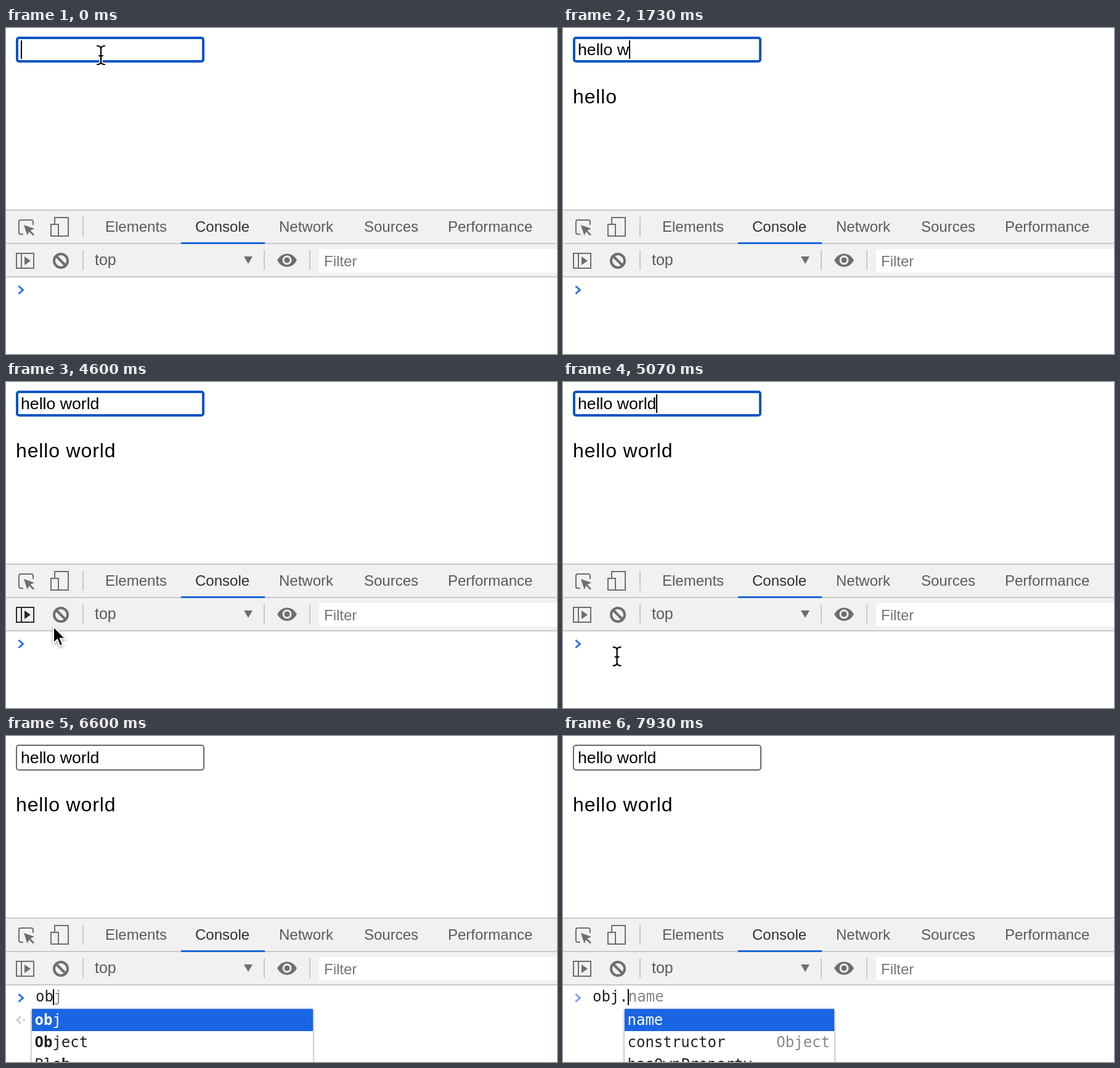
An HTML page that plays this animation: 894x528 px, repeating every 8 s.

```html
<!DOCTYPE html>
<html lang="en">
<head>
<meta charset="utf-8">
<title>Two-way binding demo</title>
<style>
html, body { margin: 0; width: 100%; height: 100%; overflow: hidden; background: #fff; }
svg { display: block; }
text { white-space: pre; font: 24px "Liberation Sans", Arial, sans-serif; fill: #5a5a5a; }
#field { font-size: 26.667px; fill: #000; }
#para { font-size: 32px; letter-spacing: .85px; fill: #000; }
.mono, .mono text { font-family: "DejaVu Sans Mono", Menlo, monospace; fill: #222; }
.mono .ghost, .mono .note { fill: #888; }
.mono .picked { fill: #fff; }
.bold { font-weight: bold; }
.panel { fill: #fff; filter: drop-shadow(0 1px 2px rgba(0,0,0,.5)); }
.line { fill: none; stroke: #6e6e6e; stroke-width: 2; }
.solid { fill: #6e6e6e; }
</style>
</head>
<body>
<svg width="894" height="528" viewBox="0 0 894 528">
  <rect id="box" fill="#fff"/>
  <text id="field" x="24" y="44"></text>
  <text id="para" x="16" y="122"></text>
  <rect id="fieldCaret" y="20" width="2" height="30"/>

  <rect y="294" width="894" height="110" fill="#f1f1f1"/>
  <path d="M0 295H894M0 349H894M0 403H894M125 306V338M125 360V392M419 360V392M493 360V392" stroke="#c8c8c8" stroke-width="2"/>
  <rect x="284" y="347" width="136" height="3" fill="#1a67d6"/>
  <rect x="508" y="358" width="386" height="38" fill="#fff"/>
  <text x="161" y="330">Elements</text>
  <text x="307" y="330" style="fill:#303030">Console</text>
  <text x="443" y="330">Network</text>
  <text x="581" y="330">Sources</text>
  <text x="717" y="330">Performance</text>
  <text x="144" y="384" style="font-size:25px">top</text>
  <text x="516" y="386" style="fill:#757575">Filter</text>

  <path class="line" d="M44 319V314Q44 311 41 311H24Q21 311 21 314V331Q21 334 24 334H28"/>
  <path class="solid" d="M29 319L46 325L39.500 328L46 334.500L44 336.500L37.500 330L34.500 336Z"/>
  <path class="line" d="M79 317V307H101V337H86M73 318H85V337H73Z"/>
  <g id="sidebar">
    <path fill="none" stroke-width="2" d="M17 365H45V389H17ZM25 365V389"/>
    <path stroke="none" d="M30 370L40 377L30 384Z"/>
  </g>
  <g class="line" style="stroke-width:4"><circle cx="89" cy="377" r="11"/><path d="M81 369L97 385"/></g>
  <path class="solid" d="M386 370H400L393 382Z"/>
  <path class="solid" d="M440 376Q446 365.500 456 365.500T472 376Q466 387 456 387T440 376Z"/>
  <circle cx="456" cy="376" r="6" class="solid" stroke="#f1f1f1" stroke-width="3"/>

  <path id="prompt" d="M20.500 418L27.500 424.200L20.500 430.500" fill="none" stroke="#2f6fe6" stroke-width="3"/>
  <g class="mono">
    <text x="48" y="430"><tspan id="typed"></tspan><tspan id="ghost" class="ghost"></tspan></text>
    <g id="preview">
      <path d="M24 454.500L18 460.200L24 466" fill="none" stroke="#c9c9c9" stroke-width="2.500"/>
      <circle cx="29" cy="460" r="2" fill="#c9c9c9"/>
      <text id="result" x="48" y="468" class="ghost">{}</text>
    </g>
  </g>
  <rect id="consoleCaret" y="410" width="2" height="26"/>
  <g id="popups" class="mono"></g>

  <g id="beam" fill="none" stroke-linecap="round">
    <path id="beamShape" d="M-6 -15Q0 -15 0 -10Q0 -15 6 -15M0 -10V10M-6 15Q0 15 0 10Q0 15 6 15M-3 1H3" stroke="#fff" stroke-width="5"/>
    <use href="#beamShape"/>
    <path d="M-6 -15Q0 -15 0 -10Q0 -15 6 -15M0 -10V10M-6 15Q0 15 0 10Q0 15 6 15M-3 1H3" stroke="#000" stroke-width="2.200"/>
  </g>
  <path id="arrow" d="M0 0V27L6.200 21.300L10.500 31.500L15.200 29.500L11 19.500H19.500Z"
    stroke="#fff" stroke-width="2" style="filter:drop-shadow(0 2px 2px rgba(0,0,0,.35))"/>
</svg>
<script>
const LOOP = 8000, LAG = 67, BLINK = 1000, CHAR = 14.45;
const $ = id => document.getElementById(id);
const show = (el, on) => el.setAttribute('display', on ? 'inline' : 'none');
const attrs = (el, values) => Object.entries(values).forEach(([k, v]) => el.setAttribute(k, v));

const PHRASE = 'hello world';
const KEYS = [530, 670, 800, 930, 1070, 1270, 1730, 1930, 2400, 2600, 2800];
const BLUR = 5200, FOCUS = 5270;

// [time, typed, ghost]
const CONSOLE = [
  [0, '', ''], [6000, 'o', ''], [6070, 'o', 'bj'], [6530, 'ob', 'j'],
  [7470, 'obj', ''], [7800, 'obj.', ''], [7870, 'obj.', 'name']
];
const CONSOLE_KEYS = [FOCUS, 6000, 6530, 7470, 7800];

// Rows: [before match, match, after match, note]
const POPUPS = [
  { from: 6070, to: 6600, x: 42, w: 571, rows: [['', 'o', 'bj'], ['', 'o', 'nabort'], ['', 'o', 'nblur']] },
  { from: 6600, to: 7470, x: 42, w: 456, rows: [['', 'ob', 'j'], ['', 'Ob', 'ject'], ['Bl', 'ob', '']] },
  { from: 7870, to: LOOP, x: 100, w: 340,
    rows: [['name', '', ''], ['constructor', '', '', 'Object'], ['hasOwnProperty', '', '']] }
];

// [time, x, y]
const MOUSE = [
  [4130, 118, 84], [4200, 84, 120], [4270, 62, 146], [4330, 53, 157],
  [4530, 22, 370], [4600, 77, 396], [4670, 88, 446], [4870, 90, 456], [5200, 86, 437]
];

const popupMarkup = ({ x, w, rows }) => `<g><rect class="panel" x="${x}" y="442" width="${w}" height="110"/>
  <rect x="${x}" y="442" width="${w}" height="36" fill="#1a65e3"/>` +
  rows.map(([pre, match, post, note], i) => `<text x="${x + 4.5}" y="${468 + 36 * i}" class="${i ? '' : 'picked'}">` +
    `${pre}<tspan class="bold">${match}</tspan>${post}</text>` +
    (note ? `<text class="note" x="${x + w - 7}" y="${468 + 36 * i}" text-anchor="end">${note}</text>` : '')
  ).join('') + '</g>';
$('popups').innerHTML = POPUPS.map(popupMarkup).join('');
const popupNodes = [...$('popups').children];

const pen = document.createElement('canvas').getContext('2d');
pen.font = '26.667px "Liberation Sans", Arial, sans-serif';

const latest = (list, t) => list.filter(item => item[0] <= t).pop();
const typedAt = t => PHRASE.slice(0, KEYS.filter(k => k <= t).length);

// The caret stays lit for half a blink after each key.
const caretLit = (keys, t, start) => {
  const last = keys.filter(k => k <= t).pop() ?? start;
  return (t - last) % BLINK < 530;
};

function mouseAt(t) {
  if (t < KEYS[0]) return [154, 44];
  const next = MOUSE.findIndex(p => p[0] > t);
  if (next < 0) return [86, 437];
  if (next === 0) return [154, 44];
  const [t0, x0, y0] = MOUSE[next - 1], [t1, x1, y1] = MOUSE[next];
  if (t0 === 4330) return [x0, y0];
  const u = (t - t0) / (t1 - t0);
  return t0 < 4670 ? [x0, y0] : [x0 + (x1 - x0) * u, y0 + (y1 - y0) * u];
}

function drawPage(t) {
  const focused = t < BLUR, text = typedAt(t);
  attrs($('box'), focused
    ? { x: 18, y: 16, width: 302, height: 38, rx: 3, stroke: '#0754c4', 'stroke-width': 4 }
    : { x: 17, y: 15, width: 304, height: 40, rx: 4, stroke: '#676767', 'stroke-width': 2 });
  $('field').textContent = text;
  $('para').textContent = typedAt(t - LAG);
  $('fieldCaret').setAttribute('x', Math.round(24 + pen.measureText(text).width));
  show($('fieldCaret'), focused && caretLit(KEYS, t, -200));
}

function drawConsole(t) {
  const [, typed, ghost] = latest(CONSOLE, t);
  $('typed').textContent = typed;
  $('ghost').textContent = ghost;
  $('consoleCaret').setAttribute('x', Math.round(47.5 + CHAR * typed.length));
  show($('consoleCaret'), t >= FOCUS && caretLit(CONSOLE_KEYS, t + (t < 6000 ? 5 : 0), FOCUS)
    && !(t >= 7130 && t < 7470));
  show($('preview'), t >= 6200 && t < 7800);
  show($('result'), t >= 7470);
  $('prompt').setAttribute('opacity', t >= 7930 ? .65 : 1);
  POPUPS.forEach((p, i) => show(popupNodes[i], t >= p.from && t < p.to));
  const tone = t >= 4530 && t < 4670 ? '#2b2b2b' : '#6e6e6e';
  attrs($('sidebar'), { stroke: tone, fill: tone });
}

function drawMouse(t) {
  const [x, y] = mouseAt(t);
  const visible = t < KEYS[0] || (t >= MOUSE[0][0] && t < 6000);
  const arrow = t >= MOUSE[0][0] && t < 4670;
  for (const [id, on] of [['arrow', arrow], ['beam', !arrow]]) {
    show($(id), visible && on);
    $(id).setAttribute('transform', `translate(${x} ${y})`);
  }
}

function frame(now) {
  const t = now % LOOP;
  drawPage(t);
  drawConsole(t);
  drawMouse(t);
  requestAnimationFrame(frame);
}
frame(0);
</script>
</body>
</html>
```
